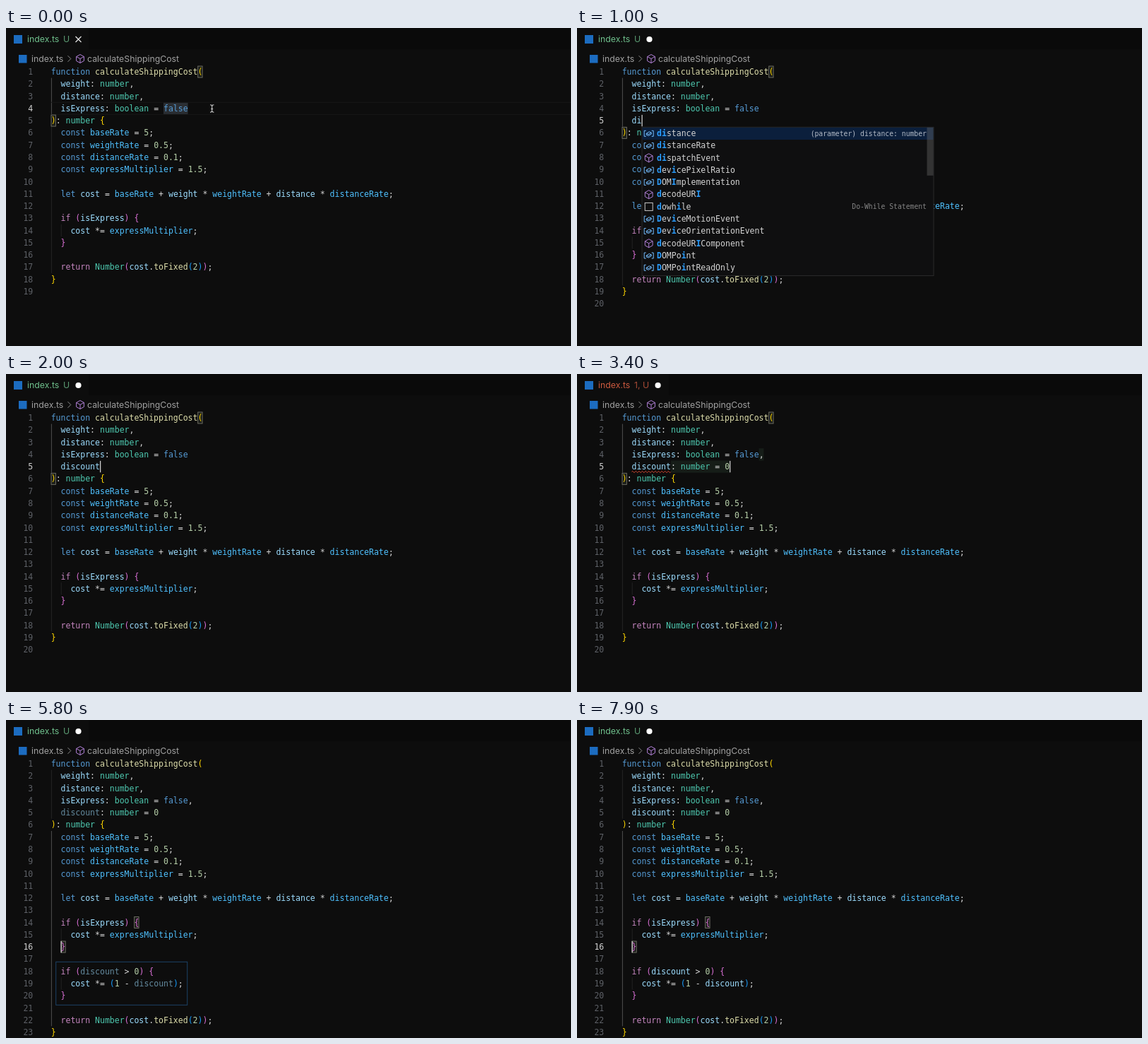
Recreate the animation shown at these times as an HTML page. Size 800 by 450 pixels, loop 8000 ms.

```html
<!DOCTYPE html>
<html lang="en">
<head>
<meta charset="utf-8">
<title>Editor completion</title>
<style>
html, body { margin: 0; width: 100%; height: 100%; overflow: hidden; background: #0d0d0d; }
svg { display: block; width: 100vw; height: 100vh; }
text { white-space: pre; font: 11.5px "DejaVu Sans Mono", "Liberation Mono", monospace; fill: #d4d4d4; }
.ui { font: 12.3px Inter, Roboto, sans-serif; }
.small { font-size: 9.75px; }
.hit { fill: #2a9dff; font-weight: bold; }
.ghost { fill: #5c5c5c; font-style: italic; }
</style>
</head>
<body>
<svg id="stage" viewBox="0 0 800 450"></svg>
<script>
const LOOP = 8000, CHAR = 6.9236, LEFT = 63.7, PITCH = 17.27;
const INSERT = 400, POPUP = 900, HINT = 2500, ERROR = 2800, ACCEPT = 3400;
const CLEAR = 3900, GHOST = 4700, APPLY = 5500, USED = 6800;
const KEYS = [700, 900, 1200, 1300, 1400, 1600, 1700, 1800];
const TEAL = '#4ec9b0', BLUE = '#569cd6', PURPLE = '#b180d7', SQUARE = '#1c6cc0';
const BRACKETS = ['#ffd700', '#da70d6', '#179fff'];

const RULES = [
  [/^(function|const|let|false)$/, BLUE],
  [/^(if|return)$/, '#c586c0'],
  [/^(number|boolean|Number)$/, TEAL],
  [/^(calculateShippingCost|toFixed)$/, '#dcdcaa'],
  [/(Rate|Multiplier)$/, '#4fc1ff'],
  [/^\d/, '#b5cea8'],
  [/^[a-z]/i, '#9cdcfe']
];

const HEAD = [
  'function calculateShippingCost(',
  '  weight: number,',
  '  distance: number,',
  '  isExpress: boolean = false'
];
const BODY = [
  '): number {',
  '  const baseRate = 5;',
  '  const weightRate = 0.5;',
  '  const distanceRate = 0.1;',
  '  const expressMultiplier = 1.5;',
  '',
  '  let cost = baseRate + weight * weightRate + distance * distanceRate;',
  '',
  '  if (isExpress) {',
  '    cost *= expressMultiplier;'
];
const ADDED = ['  }', '', '  if (discount > 0) {', '    cost *= (1 - discount);'];
const TAIL = ['  }', '', '  return Number(cost.toFixed(2));', '}', ''];

// v: variable, c: callable, s: snippet
const ITEMS = [
  ['distance', 'v', '(parameter) distance: number'], ['distanceRate', 'v'],
  ['dispatchEvent', 'c'], ['devicePixelRatio', 'v'], ['DOMImplementation', 'v'],
  ['decodeURI', 'c'], ['dowhile', 's', 'Do-While Statement'],
  ['DeviceMotionEvent', 'v'], ['DeviceOrientationEvent', 'v'],
  ['decodeURIComponent', 'c'], ['DOMPoint', 'v'], ['DOMPointReadOnly', 'v']
];

const stage = document.getElementById('stage');
const rowY = row => 62 + PITCH * (row - 1);
const colX = col => LEFT + CHAR * col;
const esc = s => s.replace(/&/g, '&amp;').replace(/</g, '&lt;').replace(/>/g, '&gt;');
const rect = (x, y, w, h, fill, more = '') =>
  `<rect x="${x}" y="${y}" width="${w}" height="${h}" fill="${fill}" ${more}/>`;
const path = (d, stroke, w = 1) =>
  `<path d="${d}" fill="none" stroke="${stroke}" stroke-width="${w}"/>`;
const label = (x, y, s, more = '') => `<text x="${x}" y="${y}" ${more}>${s}</text>`;
const span = (s, fill, more = '') => `<tspan fill="${fill}" ${more}>${esc(s)}</tspan>`;

function cube(x, y, s = 6) {
  const h = s / 2, d = s * 0.9;
  return path(`M${x} ${y - s}L${x + d} ${y - h}V${y + h}L${x} ${y + s}L${x - d} ${y + h}V${y - h}Z` +
    `M${x - d} ${y - h}L${x} ${y}L${x + d} ${y - h}M${x} ${y}V${y + s}`, PURPLE);
}

function icon(kind, x, y) {
  if (kind === 'c') return cube(x, y);
  if (kind === 's') return rect(x - 5.5, y - 5.5, 11, 11, 'none', 'stroke="#c8c8c8"');
  return path(`M${x - 4} ${y - 4}h-2.5v8h2.5M${x + 4} ${y - 4}h2.5v8h-2.5` +
    `M${x - 3.5} ${y}l4 -2.5l3 1.3v2l-4 2.3l-3 -1.3zl3 1.3l4 -2.5`, '#75beff');
}

function highlight(line, depth, faded) {
  const out = (line.match(/[A-Za-z]+|[\d.]*\d|\s+|./g) || []).map(tok => {
    if (/[({]/.test(tok)) return span(tok, BRACKETS[depth.n++ % 3]);
    if (/[)}]/.test(tok)) return span(tok, BRACKETS[--depth.n % 3]);
    const rule = RULES.find(([re]) => re.test(tok));
    const dim = faded && tok === 'discount' ? 'opacity=".6"' : '';
    return span(tok, rule ? rule[1] : '#d4d4d4', dim);
  });
  return out.join('');
}

function document_(t) {
  const typed = 'discount'.slice(0, KEYS.filter(k => t >= k).length);
  const hint = t >= HINT;
  const lines = HEAD.slice();
  if (hint) lines[3] += ',';
  if (t >= INSERT) lines.push('  ' + typed + (hint ? ': number = 0' : ''));
  lines.push(...BODY);
  const ghostAt = lines.length;
  if (t >= GHOST) lines.push(...ADDED);
  lines.push(...TAIL);
  const isGhost = i => t >= GHOST && t < APPLY && i >= ghostAt && i < ghostAt + ADDED.length;
  return { typed, lines, isGhost };
}

function header(t) {
  const error = t >= ERROR && t < CLEAR, dirty = t >= INSERT;
  const edge = error ? 130 : 117, x = error ? 114.6 : 102.5;
  const color = error ? '#cc5a3f' : '#6fbf8c';
  return rect(edge, 0, 800 - edge, 30, '#0a0a0a') +
    rect(11, 10, 12, 12, SQUARE) +
    label(30, 20.4, span('index.ts', color), 'class="ui"') +
    label(81, 20.4, span(error ? '1, U' : 'U', color, 'opacity=".8"'), 'class="ui"') +
    (dirty ? `<circle cx="${x}" cy="16" r="4.1" fill="#fff"/>`
           : path('M98.5 12l8 8m0 -8l-8 8', '#e8e8e8', 1.2)) +
    rect(18, 38, 11.5, 11.5, SQUARE) +
    label(36, 47.7, span('index.ts', '#a0a0a0'), 'class="ui"') +
    path('M87.5 39.2l4.3 4.3l-4.3 4.3', '#8c8c8c') + cube(105, 43.5) +
    label(115, 47.7, span('calculateShippingCost', '#a0a0a0'), 'class="ui"');
}

function guide(col, from, to, color) {
  const x = colX(col) + 0.7, top = rowY(from) - PITCH / 2;
  return path(`M${x} ${top}V${rowY(to) + PITCH / 2}`, color);
}

function guides(t, lines) {
  const close = lines.findIndex(s => s[0] === ')') + 1;
  const inBody = t >= APPLY, on = '#505050', off = '#262626';
  const inner = lines.map((s, i) => s.startsWith('    ') ? guide(2, i + 1, i + 1, '#222') : '');
  return guide(0, 2, close - 1, inBody ? off : on) +
    guide(0, close + 1, lines.length - 2, inBody ? on : off) + inner.join('');
}

const pairBox = (row, col) =>
  rect(colX(col) + 0.3, rowY(row) - 8, CHAR - 0.6, 16, '#1a1c18', 'stroke="#77776c" stroke-width=".9"');

function marks(t, lines) {
  let out = '';
  if (t < INSERT) {
    const y = rowY(4);
    out += path(`M64 ${y - 8.6}H800M64 ${y + 8.6}H800`, '#171717') +
      rect(colX(23), y - 8, CHAR * 5, 16, '#2a2e33');
  }
  if (t >= HINT && t < APPLY) {
    out += rect(colX(28), rowY(4) - 8.6, CHAR, PITCH, '#161d18') +
      rect(colX(10), rowY(5) - 8.6, CHAR * 12, PITCH, '#161d18');
  }
  const close = lines.findIndex(s => s[0] === ')') + 1;
  out += t < APPLY ? pairBox(1, 30) + pairBox(close, 0) : pairBox(14, 17) + pairBox(16, 2);
  if (t >= ERROR && t < CLEAR) {
    out += path(`M${colX(2)} 138.5` + 'q1.15 -2.4 2.3 0t2.3 0'.repeat(12), '#e5482f');
  }
  return out;
}

function code(t, doc) {
  const depth = { n: 0 };
  const current = t < INSERT ? 4 : t < APPLY ? 5 : 16;
  const faded = t >= CLEAR && t < USED;
  let n = 0;
  return doc.lines.map((line, i) => {
    const y = rowY(i + 1) + 4.1;
    if (doc.isGhost(i)) return label(LEFT, y, esc(line), 'class="ghost"');
    n++;
    return label(38.3, y, span(String(n), n === current ? '#d0d0d0' : '#5d6066'), 'text-anchor="end"') +
      label(LEFT, y, highlight(line, depth, faded));
  }).join('');
}

function caret(t, typed) {
  const start = [APPLY, ACCEPT, ...KEYS.slice().reverse(), INSERT].find(k => t >= k);
  if (start === undefined || (t - start) % 1000 >= 500) return '';
  const row = t < APPLY ? 5 : 16;
  const col = t >= APPLY ? 2 : t >= ACCEPT ? 22 : 2 + typed.length;
  return rect(colX(col) + 0.1, rowY(row) - 8.2, 1.2, 16.4, '#d8d8d8');
}

// Marks the letters of the query in order; null when they do not all occur.
function match(name, query) {
  let q = 0;
  const out = [...name].map(ch => {
    const hit = q < query.length && ch.toLowerCase() === query[q];
    if (hit) q++;
    return hit ? `<tspan class="hit">${ch}</tspan>` : ch;
  });
  return q === query.length ? out.join('') : null;
}

function popup(t, typed) {
  if (t < POPUP || t > KEYS[7]) return '';
  const found = ITEMS.map(([name, kind, info]) => ({ name: match(name, typed), kind, info }))
    .filter(item => item.name);
  if (!found.length) return '';
  const top = 140.3, h = found.length * PITCH + 3;
  let out = rect(92, top, 413, h, '#0f0f10', 'stroke="#2a2a2a"') +
    rect(92.5, top + 0.5, 412, PITCH, '#0b1f3c');
  if (found.length === ITEMS.length) out += rect(495.5, top + 0.5, 9, 68, '#777', 'opacity=".35"');
  found.forEach(({ name, kind, info }, i) => {
    const y = 149 + i * PITCH;
    out += icon(kind, 101.7, y + 0.3) + label(113, y + 4.1, name);
    if (info) out += label(495, y + 3.6, span(info, i ? '#858585' : '#b4bcc8'),
      'class="small" text-anchor="end"');
  });
  return out;
}

function extras(t) {
  if (t < 300) {
    return path('M289 108.8q2.7 0 2.7 1.6q0 -1.6 2.7 -1.6M291.7 110V118' +
      'M289 119.2q2.7 0 2.7 -1.6q0 1.6 2.7 1.6M290.2 114.5h3', '#d0d0d0', 1.1);
  }
  if (t >= GHOST && t < APPLY) {
    return rect(92.5, 385, 44.5, 13.5, '#121110', 'rx="3" stroke="#a8643f"') +
      label(98, 395.6, span('⇥ tab', '#b0b0b0'), 'style="font-size:11px"');
  }
  const fade = Math.min(1, Math.max(0, (7100 - t) / 500));
  return t >= APPLY && fade
    ? rect(70.7, 342.3, 186, 61, 'none', `stroke="#1c4166" opacity="${fade}"`) : '';
}

function draw(t) {
  const doc = document_(t);
  stage.innerHTML = header(t) + guides(t, doc.lines) + marks(t, doc.lines) +
    code(t, doc) + caret(t, doc.typed) + popup(t, doc.typed) + extras(t);
}

let shown = -1;
function tick() {
  const t = Math.floor(performance.now() % LOOP / 100) * 100;
  if (t !== shown) draw(shown = t);
  requestAnimationFrame(tick);
}
tick();
</script>
</body>
</html>
```
